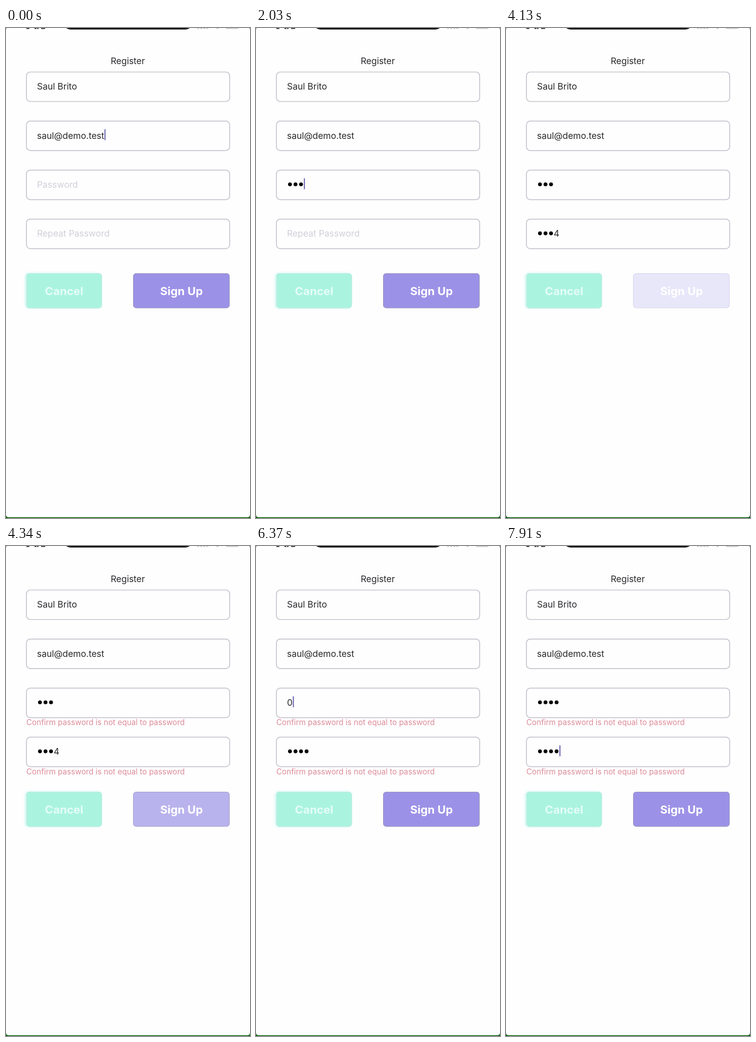
Animation of 480 by 963 pixels, one loop 8 s. Source, as an HTML page with a canvas:

```html
<!DOCTYPE html>
<html lang="en">
<head>
<meta charset="utf-8">
<title>Register form</title>
<style>
  html, body { margin: 0; width: 100%; height: 100%; overflow: hidden; background: #fefefe; }
  canvas { display: block; width: 100%; height: 100%; }
</style>
</head>
<body>
<canvas id="stage" width="480" height="963"></canvas>
<script>
const ctx = document.getElementById('stage').getContext('2d');
const LOOP = 8000;
const FONT = 'Inter, "Liberation Sans", sans-serif';
const INK = '#29292d';
const FIELD_FONT = `17.4px ${FONT}`;
const ERROR_FONT = `15.2px ${FONT}`;
const BUTTON_FONT = `700 22.2px ${FONT}`;
const LEFT = 61, DOT_STEP = 10.9;
const NAME = 'Saul Brito', EMAIL = 'saul@demo.test';
const ERROR = 'Confirm password is not equal to password';

// Each value is [start time, state]; '*' stands for a hidden character.
const PASSWORD = [
  [0, ''], [1260, '1'], [1470, '*2'], [1680, '**3'], [2030, '***'],
  [5460, ''], [6300, '0'], [6510, '*0'], [6650, '**0'], [6860, '***0'], [7350, '****']
];
const REPEAT = [
  [0, ''], [3150, '1'], [3220, '*2'], [3290, '**3'], [3430, '***4'], [4970, '****']
];
const FOCUS = [[0, 1], [700, 2], [2660, 3], [3990, -1], [5040, 2], [7770, 3]];
// Fade start, fade end, next time the caret shows.
const CARET_FADES = [[2310, 2520, 2660], [3640, 3710, 3990], [7490, 7630, 7770]];
const PRESS = 3990, RELEASE = 4200, ERROR_AT = 4270;

const clamp = v => Math.max(0, Math.min(1, v));
const ease = v => { const u = clamp(v); return u * u * (3 - 2 * u); };
const at = (steps, t) => steps.filter(s => s[0] <= t).pop()[1];
const fieldTop = i => 86.5 + i * 96.4;

function box(x, y, w, h, r) {
  ctx.beginPath();
  ctx.roundRect(x, y, w, h, r);
}

function label(text, x, y, font, color, align = 'left') {
  ctx.font = font;
  ctx.fillStyle = color;
  ctx.textAlign = align;
  ctx.fillText(text, x, y);
}

function phoneEdge() {
  ctx.fillStyle = '#85858a';
  ctx.fillRect(0, 0, 480, 480);
  ctx.fillStyle = '#0b640f';
  ctx.fillRect(0, 480, 480, 483);
  ctx.fillStyle = '#fefefe';
  box(0, -1, 480, 962.6, 5);
  ctx.fill();

  ctx.fillStyle = '#19191b';
  box(113, -30, 254, 33, 14);
  ctx.fill();

  // Lower edge of the status bar
  ctx.fillStyle = '#4a4a4e';
  for (const [x, w] of [[40, 6], [56, 4], [61, 3], [69, 8]]) ctx.fillRect(x, 0, w, 2);
  ctx.fillStyle = '#cfcfd2';
  for (let i = 0; i < 4; i++) ctx.fillRect(376 + i * 6, 0, 4, 2);
  ctx.fillRect(414, 0, 4, 2);
  box(432, -8, 26, 10, 3);
  ctx.fill();
}

function caret(x, top, alpha) {
  ctx.globalAlpha = alpha;
  ctx.fillStyle = '#6560b0';
  ctx.fillRect(x, top + 16, 2, 21.5);
  ctx.globalAlpha = 1;
}

// Draws the value and returns its right end.
function secret(value, baseline) {
  let x = LEFT;
  for (const c of value) {
    if (c === '*') {
      ctx.fillStyle = '#050505';
      ctx.beginPath();
      ctx.arc(x + 5.8, baseline - 6.8, 3.8, 0, 2 * Math.PI);
      ctx.fill();
      x += DOT_STEP;
    } else {
      label(c, x, baseline, FIELD_FONT, INK);
      x += ctx.measureText(c).width;
    }
  }
  return x;
}

function field(i, value, hint, hidden, caretAlpha) {
  const top = fieldTop(i), baseline = top + 34.7;
  ctx.strokeStyle = '#c5c3cd';
  ctx.lineWidth = 1.7;
  box(40.2, top, 399.8, 58, 7.5);
  ctx.stroke();

  let end = LEFT;
  if (!value) {
    label(hint, LEFT, baseline, FIELD_FONT, '#d2ced9');
  } else if (hidden) {
    end = secret(value, baseline);
  } else {
    label(value, LEFT, baseline, FIELD_FONT, INK);
    end += ctx.measureText(value).width;
  }
  if (caretAlpha > 0) caret(end + 0.5, top, caretAlpha);
}

function cancelButton(y) {
  ctx.save();
  ctx.shadowColor = 'rgba(150, 244, 228, 0.6)';
  ctx.shadowBlur = 5;
  ctx.shadowOffsetX = -2;
  ctx.fillStyle = '#aaf4df';
  box(40, y, 148.5, 68.5, 6);
  ctx.fill();
  ctx.restore();
  ctx.strokeStyle = '#c6e4e0';
  ctx.lineWidth = 1;
  box(40.5, y + 0.5, 147.8, 67.8, 6);
  ctx.stroke();
  label('Cancel', 114.3, y + 42.7, BUTTON_FONT, '#e6fcf6', 'center');
}

function signUpButton(y, alpha) {
  ctx.globalAlpha = alpha;
  ctx.fillStyle = '#9b92e7';
  box(250, y, 190, 68.5, 6);
  ctx.fill();
  ctx.strokeStyle = '#9a95b6';
  ctx.lineWidth = 1;
  box(250.5, y + 0.5, 189, 67.5, 6);
  ctx.stroke();
  ctx.globalAlpha = 1;
  label('Sign Up', 345.2, y + 42.7, BUTTON_FONT, '#ffffff', 'center');
}

function draw(t) {
  const focus = at(FOCUS, t);
  const fade = CARET_FADES.find(f => t >= f[0] && t < f[2]);
  const caretAlpha = fade ? 1 - clamp((t - fade[0]) / (fade[1] - fade[0])) : 1;
  const blink = i => i === focus ? caretAlpha : 0;
  const failed = t >= ERROR_AT;
  const pressed = ease((t - PRESS) / 130) - ease((t - RELEASE) / 250);

  phoneEdge();
  label('Register', 239.6, 71.3, FIELD_FONT, INK, 'center');
  field(0, NAME, '', false, 0);
  field(1, EMAIL, '', false, blink(1));
  field(2, at(PASSWORD, t), 'Password', true, blink(2));
  field(3, at(REPEAT, t), 'Repeat Password', true, blink(3));

  if (failed) {
    for (const i of [2, 3]) label(ERROR, 40, fieldTop(i) + 72.8, ERROR_FONT, '#dc8c9a');
  }
  const y = failed ? 483 : 482;
  cancelButton(y);
  signUpButton(y, 1 - 0.78 * pressed);
}

function tick() {
  draw(performance.now() % LOOP);
  requestAnimationFrame(tick);
}
tick();
</script>
</body>
</html>
```
